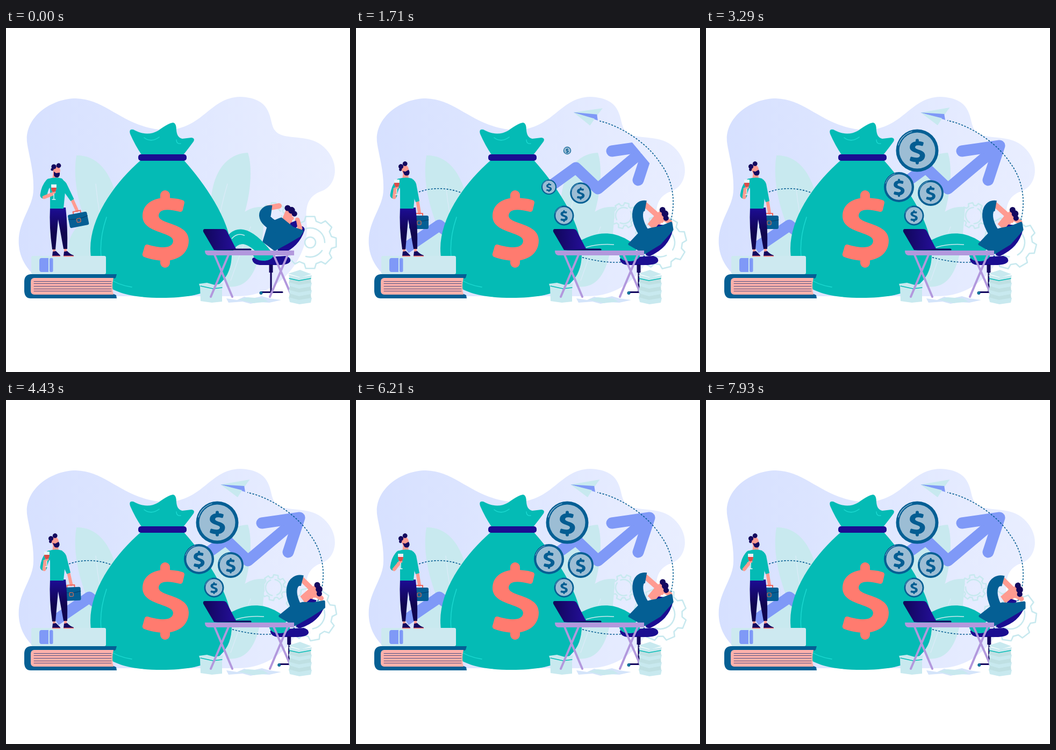
Animation, 640 px wide and 640 px high, one loop 8 s. Source, as an HTML page:

```html
<!DOCTYPE html>
<html lang="en">
<head>
<meta charset="utf-8">
<title>Passive income</title>
<style>
  html, body { margin: 0; width: 100%; height: 100%; overflow: hidden; background: #fff; }
  svg { display: block; width: 100vw; height: 100vh; }
  .line { fill: none; stroke-linecap: round; stroke-linejoin: round; }
  .butt { stroke-linecap: butt; }
  .pale { fill: #c8e9ef; }
  .teal { fill: #04bbb5; }
  .blue { fill: #045f94; }
  .navy { fill: #14085f; }
  .skin { fill: #ff9b91; }
  .indigo { fill: #1b0d91; }
</style>
</head>
<body>
<svg viewBox="0 0 640 640">
  <defs>
    <linearGradient id="sky"><stop stop-color="#d6e0ff"/><stop offset="1" stop-color="#e9eeff"/></linearGradient>
    <linearGradient id="screen"><stop stop-color="#10065a"/><stop offset="1" stop-color="#260f9c"/></linearGradient>
    <linearGradient id="trousers" x2="0" y2="1"><stop stop-color="#1d0d96"/><stop offset=".6" stop-color="#10054f"/></linearGradient>
    <g id="dollar" fill="currentColor">
      <path d="M0-63V-46M0 50V63" stroke="currentColor" stroke-width="18" stroke-linecap="round"/>
      <path d="M32-54Q36-53 36-49L33-36Q32-32 28-32C5-38-11-38-12-25C-12-8 44-12 44 21C44 48 20 59 0 59C-15 59-28 56-39 52Q-43 50-42 46L-38 32Q-36 28-32 29C-5 37 14 36 15 22C15 5-42 8-42-24C-42-48-20-58 0-58C12-58 22-57 32-54Z"/>
    </g>
    <g id="coin" color="#045d92">
      <circle r="39.5" class="blue"/>
      <circle r="33.5" fill="#9cbdd4"/>
      <path d="M-35-10A36.5 36.5 0 0 1-10-35" class="line" stroke="#9cbdd4" stroke-width="1.3"/>
      <use href="#dollar" transform="translate(0 2) scale(.33)"/>
    </g>
    <path id="route" d="M117 305Q155 292 195 306C290 345 330 400 418 426C470 440 500 438 530 428C600 390 605 300 565 250C548 222 500 183 449 172"/>
    <mask id="flown" maskUnits="userSpaceOnUse" x="0" y="0" width="640" height="640">
      <use id="reveal" href="#route" fill="none" stroke="#fff" stroke-width="6"/>
    </mask>
    <clipPath id="headClip"><rect id="headRect" x="-200" y="-120" height="240" transform="translate(557 209) rotate(-40)"/></clipPath>
  </defs>

  <path fill="url(#sky)" d="M39 212C35 165 85 131 130 131C192 133 220 190 305 190C370 182 380 130 435 128C500 130 488 175 500 190C515 212 562 194 592 222C622 250 616 292 588 303C556 314 557 340 560 370C562 420 515 500 430 499H200C110 505 30 470 24 405C20 360 51 335 51 300C52 265 42 235 39 212Z"/>

  <g class="pale">
    <path d="M131 237C122 290 140 360 180 425L215 400C215 320 195 236 131 237Z"/>
    <path d="M450 232C463 270 452 370 400 425C365 350 375 235 450 232Z"/>
    <path d="M482 333C425 328 402 390 410 481C475 490 477 395 482 333Z"/>
    <path d="M116 424C112 390 130 365 150 362L175 424Z"/>
  </g>
  <path class="line" stroke="#dcebf8" stroke-width="1.2" d="M167 290Q172 350 190 410M412 290Q400 330 392 380M455 370Q435 420 418 470"/>

  <g class="line" stroke="#c8e9ef" stroke-width="2.6">
    <g id="bigGear"><path/><circle r="10"/><path d="M-27 0A27 27 0 0 1 27 0M22 15A27 27 0 0 1-8 26"/></g>
    <g id="smallGear"><path/><circle r="15" stroke-dasharray="38 9"/></g>
  </g>

  <g class="line" stroke="#7f99f7" stroke-width="21">
    <path id="shaft" class="butt" d="M92 410L155 367L205 408L409 260L450 299L545 219"/>
    <path clip-path="url(#headClip)" d="M476 229L546 219L525 283"/>
  </g>
  <g mask="url(#flown)"><use href="#route" fill="none" stroke="#045d92" stroke-width="1.6" stroke-dasharray="3.2 2.6"/></g>
  <g id="plane">
    <path class="pale" d="M399 158L453 148L443 162L431 181Z"/>
    <path fill="#7f99f7" d="M399 158L443 160L445 171Z"/>
    <path class="pale" d="M401 159L439 168L431 181Z"/>
  </g>

  <path class="teal" d="M252 245C205 285 157 350 157 410C157 480 205 502 290 502C375 502 420 480 420 420C420 362 372 292 330 245Z"/>
  <path class="teal" d="M253 237Q240 218 231 197Q228 187 237 189Q262 203 283 191Q302 177 311 176Q317 177 317 190Q318 204 328 206L345 204Q352 205 349 211Q338 226 329 237Z"/>
  <rect class="indigo" x="246" y="235" width="90" height="12" rx="5"/>
  <path class="line" stroke="#1ddad2" stroke-width="1.4" d="M187 352Q170 402 180 443M187 463Q207 478 234 482M257 204Q270 214 285 203M317 208Q317 216 325 215"/>
  <use href="#dollar" x="296" y="374" color="#ff7b6f"/>
  <g id="coins"></g>

  <!-- books -->
  <rect x="47" y="424" width="139" height="34" rx="3" fill="#cde9f0"/>
  <path fill="#7f99f7" d="M66 428H79V454H66Q62 454 62 449V433Q62 428 66 428Z"/>
  <rect x="81" y="428" width="6.5" height="26" rx="2.5" fill="#7f99f7"/>
  <path class="blue" d="M206 458H46Q34 459 34 472V490Q35 503 46 503H206L205 497L198 494V467L204 465Z"/>
  <path fill="#ffb1ab" d="M52 465H200Q196 480 200 496H52Q46 495 46 489V472Q46 466 52 465Z"/>
  <path class="line" stroke="#4b4f83" d="M52 471.5H196M52 475.5H196M52 480.5H196M52 485.5H196M52 489.5H196"/>

  <!-- standing man -->
  <g id="briefArm">
    <path class="line" stroke="#ff9b91" stroke-width="6" d="M114 320L118 344"/>
    <path class="teal" d="M98 280Q108 279 112 290L118 322L111 324L102 300Z"/>
    <g id="brief">
      <path class="line" stroke="#f0665c" stroke-width="2" d="M110 349V345H124V349"/>
      <rect class="blue" x="99" y="349" width="36" height="25" rx="3"/>
      <path class="line" stroke="#033d68" stroke-width="1" d="M99 357Q117 362 135 357"/>
      <rect x="114" y="359" width="7" height="7" rx="1.5" class="line" stroke="#e8704f" stroke-width="1.2"/>
    </g>
  </g>
  <path class="skin" d="M87 408H92V418H87ZM108 408H113V418H108Z"/>
  <path fill="url(#trousers)" d="M82 334H111Q115 370 114 411H107L97 356L92 412H86Q80 370 82 334Z"/>
  <path class="navy" d="M87 416L93 415L101 423V424H86ZM108 416L114 415Q118 420 126 423V424H107Z"/>
  <path stroke="#ff7b6f" stroke-width="1.5" d="M86 424.5H101M107 424.5H126"/>
  <path class="skin" d="M88 268L97 270L98 281H86Z"/>
  <path class="teal" d="M77 281Q92 276 104 280Q112 287 110 305L107 336H82L82 300Z"/>
  <g id="manHead">
    <path class="skin" d="M87 258L99 257L101 265L99 275H88Z"/>
    <g class="navy"><circle cx="89" cy="258" r="4.6"/><circle cx="98" cy="256" r="4.4"/><circle cx="86" cy="263" r="2.6"/>
    <path d="M89 267L93 270L100 269Q101 276 96 278Q89 278 89 273Z"/></g>
  </g>
  <g class="line">
    <path stroke="#04bbb5" stroke-width="13" d="M80 287Q72 296 70 311"/>
    <path id="drinkArm" stroke="#ff9b91" stroke-width="6.5"/>
  </g>
  <g id="glass">
    <path fill="#e5f4f8" d="M-5-8H5Q5.5 6 0 8Q-5.5 6-5-8Z"/>
    <path fill="#d94d48" d="M-5-2H5Q4.5 6 0 7.5Q-4.5 6-5-2Z"/>
    <path class="line" stroke="#e5f4f8" stroke-width="1.4" d="M0 8V20M-3 20H3"/>
    <path class="line" stroke="#ff9b91" stroke-width="3" d="M-5 9L2 7"/>
  </g>

  <!-- papers -->
  <g class="pale">
    <path d="M410 503L430 506L443 500L458 503L476 499L490 503L512 506L490 511L470 510L455 513L440 509L414 511Z" fill="#d4e4fa"/>
    <path d="M432 505L450 501L478 503L488 509L460 512Z"/>
    <path d="M361 482L402 483V509L383 511L362 508ZM359 476L374 474L388 478L404 475L402 484H362Z"/>
  </g>
  <path class="line" stroke="#04bbb5" stroke-width="1.3" d="M362 480L385 485L402 483"/>

  <!-- chair -->
  <g id="chair">
    <path class="indigo" d="M458 431Q457 426 470 427L520 424Q531 427 529 434Q526 441 505 441H472Q460 440 458 431Z"/>
    <path class="line butt" stroke="#14085f" stroke-width="7" d="M493 440V455"/>
    <path class="line" stroke="#14085f" stroke-width="3.2" d="M493 454V491M475 491.5H514"/>
    <circle cx="474.5" cy="493" r="3" class="blue"/><circle cx="474.5" cy="493" r="1" fill="#04bbb5"/>
  </g>

  <!-- seated man -->
  <g class="line">
    <path id="chairBack" stroke="#1b0d91" stroke-width="13"/>
    <path id="rearHand" stroke="#ff9b91" stroke-width="9"/>
    <path id="forearm" stroke="#ff9b91" stroke-width="10"/>
  </g>
  <g id="sitHead">
    <path class="skin" d="M-4-14L7-9L7 9L0 21L-13 17L-9-2Z"/>
    <g class="navy"><circle cx="-1" cy="-17" r="5.2"/><circle cx="6" cy="-13" r="6"/><circle cx="11" cy="-7" r="4.8"/>
    <path class="indigo" d="M4 9L14 5L16 15L10 22L2 18Z"/></g>
    <circle cx="7" cy="1" r="3" class="skin"/>
  </g>
  <g class="line butt">
    <path id="farLeg" stroke="#04bbb5" stroke-width="17"/>
    <path id="leg" stroke="#04bbb5" stroke-width="22"/>
    <path id="crease" stroke="#c8e9ef" stroke-width="1.6"/>
  </g>
  <ellipse id="hip" class="teal" rx="19" ry="11"/>
  <polygon id="torso" class="blue" stroke="#045f94" stroke-width="5" stroke-linejoin="round"/>
  <path id="upperArm" class="line butt" stroke="#045f94" stroke-width="20"/>

  <!-- desk -->
  <path class="line" stroke="#b298dd" stroke-width="4" d="M414 422L381 500M388 422L421 500M498 422L532 500M524 422L491 500"/>
  <path fill="#b298dd" d="M370 414H536V423H376Q370 422 370 414Z"/>
  <path fill="url(#screen)" d="M370 374H404Q409 374 411 378L429 413H387L367 379Q366 374 370 374Z"/>
  <path class="navy" d="M387 413.5L428 410.5H454Q458 411 456 413.5Z"/>

  <!-- tall stack -->
  <g id="stack" class="pale"></g>
  <path class="line" stroke="#04bbb5" stroke-width="1.4" d="M527 466L545 470L567 466"/>
</svg>
<script>
const LOOP = 8000;
const $ = id => document.getElementById(id);
const set = (id, name, value) => $(id).setAttribute(name, value);
const ease = (t, from, to) => {
  const u = Math.min(1, Math.max(0, (t - from) / (to - from)));
  return u * u * (3 - 2 * u);
};
const lerp = (a, b, k) => a.map((v, i) => v + (b[i] - v) * k);
const line = p => 'M' + p;
const quadratic = p => `M${p.slice(0, 2)}Q${p.slice(2)}`;
const cubic = p => `M${p.slice(0, 2)}C${p.slice(2)}`;

function gearPath(inner, outer) {
  const points = [];
  for (let tooth = 0; tooth < 8; tooth++)
    for (const [offset, r] of [[-.27, inner], [-.17, outer], [.17, outer], [.27, inner]]) {
      const a = tooth * Math.PI / 4 + offset;
      points.push([r * Math.sin(a), -r * Math.cos(a)]);
    }
  return `M${points.join('L')}Z`;
}
$('bigGear').firstChild.setAttribute('d', gearPath(41, 49));
$('smallGear').firstChild.setAttribute('d', gearPath(19, 24));

// x, y, radius, start of growth
const coins = [[387, 349, 18.5, 700], [418, 307, 24, 1090], [359, 296, 28, 1285], [393, 228, 39.5, 1480]];
$('coins').innerHTML = '<use href="#coin"/>'.repeat(coins.length);

let sheets = '<path d="M525 457L547 450L568 458L548 464Z"/>';
for (let i = 0; i < 7; i++) {
  const y = 462 + i * 7, s = i % 2 * 2;
  sheets += `<path fill="${i % 2 ? '#bfe0e3' : '#c8e9ef'}" d="M${526 + s} ${y - 3}L545 ${y + 2}L${569 - s} ${y - 2}L${567 + s / 2} ${y + 7}L546 ${y + 10}L${528 - s} ${y + 6}Z"/>`;
}
$('stack').innerHTML = sheets;

const route = $('route'), routeLength = route.getTotalLength();
const ARROW = 589;

// Each part: upright, leaning and, where it differs, rocked back
const poses = {
  torso: [[490,364, 512,355, 533,372, 551,378, 546,386, 522,400, 500,412, 480,397],
          [531,379, 550,374, 566,371, 586,363, 588,375, 565,401, 537,418, 509,402],
          [533,384, 552,379, 572,380, 592,377, 592,387, 566,402, 537,418, 510,402]],
  upperArm: [[510,374, 468,355, 480,338, 494,340], [542,390, 515,355, 522,328, 539,331], [545,394, 522,355, 535,332, 553,337]],
  forearm: [[487,335, 508,331], [535,326, 560,348], [550,332, 568,350]],
  rearHand: [[547,373, 542,357], [584,361, 574,355], [587,370, 576,363]],
  chairBack: [[512,414, 540,402, 549,375], [545,418, 576,404, 583,375], [546,418, 578,408, 587,382]],
  farLeg: [[414,412, 438,368, 488,428], [424,414, 465,396, 515,418]],
  leg: [[412,410, 432,355, 486,424], [412,412, 470,372, 517,417]],
  crease: [[420,392, 430,380, 444,386], [428,408, 452,401, 480,403]],
  hip: [[479,422], [509,423]],
  sitHead: [[525,353, 0], [563,355, 27], [570,360, 38]]
};
const drawAs = {
  upperArm: cubic, forearm: line, rearHand: line,
  chairBack: quadratic, farLeg: quadratic, leg: quadratic, crease: quadratic
};

function drawSeatedMan(t) {
  const slide = ease(t, 0, 1390);
  const rock = t < 3200 ? 0 : (1 - Math.cos((t - 3200) / 3200 * 2 * Math.PI)) / 2;
  const pose = {};
  for (const [part, [upright, leaning, rocked = leaning]] of Object.entries(poses)) {
    const base = lerp(upright, leaning, slide);
    pose[part] = base.map((v, i) => v + (rocked[i] - leaning[i]) * rock);
    if (drawAs[part]) set(part, 'd', drawAs[part](pose[part]));
  }
  set('torso', 'points', pose.torso);
  set('hip', 'cx', pose.hip[0]);
  set('hip', 'cy', pose.hip[1]);
  const [x, y, turn] = pose.sitHead;
  set('sitHead', 'transform', `translate(${x} ${y}) rotate(${turn}) scale(1.06)`);
  set('chair', 'transform', `translate(${33 * slide + rock * .8})`);
}

function drawStandingMan(t) {
  const settle = ease(t, 0, 880), lower = ease(t, 4500, 6000);
  const bump = t > 3450 && t < 5600 ? Math.sin((t - 3450) / 2150 * Math.PI) ** 2 : 0;
  const swing = -15 * (1 - settle) - 3.5 * bump;
  set('briefArm', 'transform', `rotate(${swing} 108 288)`);
  set('brief', 'transform', `rotate(${-swing * .25} 117 345)`);
  set('manHead', 'transform', `translate(0 ${-2.5 * settle}) rotate(${-22 * settle} 92 273)`);
  const [x, y] = lerp(lerp([89, 299], [76, 290], settle), [83, 294], lower);
  set('glass', 'transform', `translate(${x} ${y})`);
  set('drinkArm', 'd', `M71 315L${x - 3} ${y + 10}`);
}

function drawGrowth(t) {
  const grown = ease(t, 70, 2000) * ARROW;
  set('shaft', 'stroke-dasharray', `${grown} 999`);
  set('shaft', 'visibility', grown ? 'visible' : 'hidden');
  set('headRect', 'width', Math.max(0, 200 - ARROW + grown));

  const flight = ease(t, 70, 1790), distance = flight * routeLength;
  set('reveal', 'stroke-dasharray', `${distance} 2000`);
  const here = route.getPointAtLength(distance);
  const back = route.getPointAtLength(Math.max(0, distance - 4));
  const heading = Math.atan2(here.y - back.y, here.x - back.x) * 180 / Math.PI;
  set('plane', 'transform', `translate(${here.x} ${here.y}) rotate(${heading - 192}) translate(-449 -172)`);
  set('plane', 'visibility', flight > .56 ? 'visible' : 'hidden');

  coins.forEach(([x, y, r, start], i) => {
    const scale = r / 39.5 * ease(t, start, start + 850);
    $('coins').children[i].setAttribute('transform', `translate(${x} ${y}) scale(${scale})`);
  });
}

function frame() {
  const t = performance.now() % LOOP;
  set('bigGear', 'transform', `translate(566 399) rotate(${t * .018})`);
  set('smallGear', 'transform', `translate(498 349) rotate(${-t * .018})`);
  drawGrowth(t);
  drawStandingMan(t);
  drawSeatedMan(t);
  requestAnimationFrame(frame);
}
frame();
</script>
</body>
</html>
```
